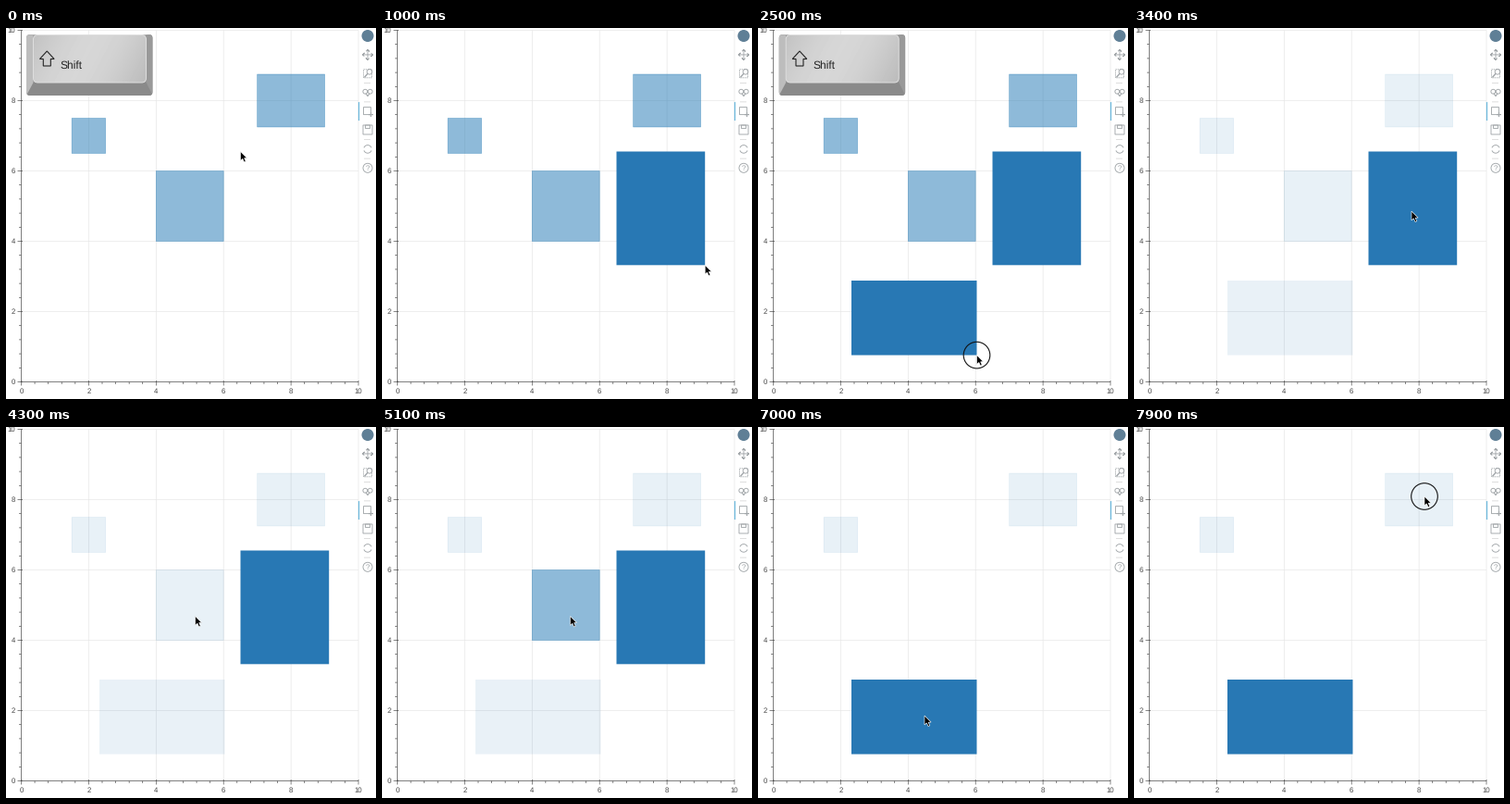
These frames come from a looping animation (400 px wide and 401 px high, 8000 ms). A matplotlib script:

```python
import matplotlib.pyplot as plt
import numpy as np
from matplotlib.animation import FuncAnimation
from matplotlib.patches import Arc, Circle, FancyBboxPatch, Polygon, Rectangle

W, H, DPI = 400, 401, 100
FRAMES, STEP = 80, 100
PT = 72 / DPI
THIN = 0.65
INK, GRID, ICON = "#444444", "#e5e5e5", "#a1a6a9"
BLUE, DEEP = "#1f77b4", "#2878b4"
NORMAL, MUTED = 0.5, 0.1

plt.rcParams.update({"path.snap": False, "text.hinting": "none",
                     "font.family": "Liberation Sans"})
fig = plt.figure(figsize=(W / DPI, H / DPI), dpi=DPI, facecolor="white")
ax = fig.add_axes([0, 0, 1, 1])
ax.axis("off")


def px(x):
    return 16.5 + 36.45 * x


def py(y):
    return 382.5 - 38 * y


def line(xs, ys, color=INK, width=THIN, z=1.0):
    return ax.plot(xs, ys, color=color, lw=width * PT, zorder=z,
                   solid_capstyle="butt")[0]


def label(x, y, s, size, color=INK, z=3.0, **kw):
    return ax.text(x, y, s, fontsize=size * PT, color=color, zorder=z, **kw)


def outline(patch, color=ICON, width=0.9, z=3.0):
    patch.set(fill=False, edgecolor=color, linewidth=width * PT, zorder=z)
    return ax.add_patch(patch)


def fill(patch, color, z):
    patch.set(facecolor=color, edgecolor="none", zorder=z)
    return ax.add_patch(patch)


def draw_axes():
    xs, ys = [px(0), px(10)], [py(0), py(10)]
    for v in range(0, 11, 2):
        line([px(v)] * 2, ys, GRID)
        line(xs, [py(v)] * 2, GRID)
    line(xs, [ys[0]] * 2, z=4)
    line([xs[0]] * 2, ys, z=4)
    for i in range(26):
        v, major = i / 2.5, i % 5 == 0
        out, inside = (4, 1.5) if major else (2.5, 0)
        line([px(v)] * 2, [ys[0] - inside, ys[0] + out], z=4)
        line([xs[0] - out, xs[0] + inside], [py(v)] * 2, z=4)
        if major:
            label(px(v), 393, f"{v:.0f}", 7.8, ha="center", va="center")
            label(10.3, py(v) + 0.3, f"{v:.0f}", 7.8, ha="right",
                  va="center")


def draw_toolbar():
    cx, gap = 391, 20.4
    _, pan, zoom, wheel, edit, save, reset, info = 8.5 + gap * np.arange(8)
    fill(Circle((cx, 8.5), 6.5), "#5f7f96", 3)
    for y in (zoom, wheel, save, reset):
        line([cx - 4, cx + 3], [y + gap / 2] * 2, "#cccccc")
    line([381.5] * 2, [edit - 10, edit + 10], "#6db9dc", 1.3, z=5)

    for turn in range(4):
        c, s = np.cos(turn * np.pi / 2), np.sin(turn * np.pi / 2)
        u, v = np.array([0, 5.5, 3.7, 5.5, 3.7]), np.array([0, 0, 1.8, 0, -1.8])
        line(cx + c * u - s * v, pan + s * u + c * v, ICON, 0.9)

    frame = outline(Rectangle((cx - 4.5, zoom - 4.5), 9, 9))
    frame.set_linestyle((0, (1.5, 1)))
    outline(Circle((cx + 2, zoom - 2), 2.8))
    line([cx, cx - 3.5], [zoom, zoom + 4], ICON, 1.4)

    for side in (-1, 1):
        outline(Circle((cx + 2.7 * side, wheel - 1), 2.4))
        line([cx, cx + 2 * side], [wheel + 4, wheel + 1], ICON, 1.1)

    outline(Rectangle((cx - 4.5, edit - 4.5), 8, 8))
    line([cx + 1, cx + 6], [edit + 3.5] * 2, ICON, 1.2)
    line([cx + 3.5] * 2, [edit + 1, edit + 6], ICON, 1.2)

    outline(Rectangle((cx - 5, save - 5.5), 10, 10))
    outline(Rectangle((cx - 2.5, save - 5.5), 5, 3.5))

    for start in (20, 200):
        outline(Arc((cx, reset), 8.6, 8.6, theta1=start, theta2=start + 140))

    outline(Circle((cx, info), 5))
    label(cx, info + 0.3, "?", 8, ICON, ha="center", va="center")


def rounded(x, y, w, h, r):
    return FancyBboxPatch((x, y), w, h,
                          boxstyle=f"round,pad=0,rounding_size={r}")


def corners(x, y, w, h):
    return [(x, y), (x + w, y), (x + w, y + h), (x, y + h)]


def make_key(x, y, name):
    """A bevelled key cap; returns its artists."""
    w, h = 136.5, 66
    inner = (x + 7.5, y + 0.5, w - 14.5, 51.5)
    body = fill(rounded(x, y, w, h, 4), "#8c8c8c", 10)
    parts = [body]
    rim, top = corners(x, y, w, h), corners(*inner)
    for i, grey in enumerate((0.85, 0.6, 0.54, 0.74)):
        j = (i + 1) % 4
        bevel = fill(Polygon([rim[i], rim[j], top[j], top[i]]), str(grey), 10.5)
        bevel.set_clip_path(body)
        parts.append(bevel)

    face = fill(rounded(*inner, 5), "#cccccc", 11)
    u, v = np.meshgrid(np.linspace(0, 1, 64), np.linspace(0, 1, 64))
    tone = 0.76 + 0.08 * np.sin(np.pi * (0.9 * u + 0.2 * v))
    x0, y0, fw, fh = inner
    shine = ax.imshow(tone, cmap="gray", vmin=0, vmax=1, aspect="auto",
                      extent=(x0, x0 + fw, y0 + fh, y0), zorder=11.2)
    shine.set_clip_path(face)
    edge = outline(rounded(*inner, 5), "#dedede", 1, 11.5)
    parts += [face, shine, edge]

    if name == "Shift":
        half = np.array([(0, 0), (7.8, 8.5), (4, 8.5), (4, 16)])
        shape = np.vstack([half, half[::-1] * (-1, 1)]) + (x + 22.3, y + 18)
        parts.append(outline(Polygon(shape), "#222222", 1.1, 12))
        size, tx = 12, x + 36.5
    else:
        ty = y + 15.5
        head = np.array([(0, 0), (7, -3.5), (7, 3.5)]) + (x + 20.5, ty)
        parts.append(line([x + 26, x + 58.5], [ty] * 2, "#111111", 1.2, 12))
        parts.append(fill(Polygon(head), "#111111", 12))
        size, tx = 12.8, x + 39
    parts.append(label(tx, y + 37, name, size, "#222222", 12))
    return parts


def block(x0, y0, x1, y1, color=BLUE, edge=THIN):
    return ax.add_patch(Rectangle((x0, y0), x1 - x0, y1 - y0, fc=color,
                                  ec=color, lw=edge * PT, alpha=NORMAL,
                                  zorder=2))


def data_block(cx, cy, w, h):
    return block(px(cx - w / 2), py(cy + h / 2),
                 px(cx + w / 2), py(cy - h / 2))


def grow(rect, end):
    x, y = rect.get_xy()
    rect.set(width=end[0] - x, height=end[1] - y)


draw_axes()
draw_toolbar()

small = data_block(2, 7, 1, 1)
middle = data_block(5, 5, 2, 2)
corner = data_block(8, 8, 2, 1.5)

TALL, WIDE = (253.5, 133.5), (101, 273)
tall = block(*TALL, *TALL, DEEP, 0)
wide = block(*WIDE, *WIDE, DEEP, 0)

keys = [
    (make_key(22, 7, "Shift"), 0, 900),
    (make_key(22.7, 7, "Shift"), 1600, 2800),
    (make_key(22, 7, "Shift"), 4400, 5000),
    (make_key(21.7, 7.5, "Backspace"), 5400, 6300),
]

# pointer moves: start, arrival, place; each arrival is a click
MOVES = [
    (0, 100, TALL),
    (300, 800, (349.2, 256.3)),
    (1000, 1600, WIDE),
    (1800, 2400, (236.5, 353.6)),
    (2700, 3200, (300, 198)),
    (3600, 4500, (203.5, 204.5)),
    (6300, 6800, (180, 312)),
    (7200, 7800, (314, 75)),
]
CLICK_TIME = 200

ARROW = 0.96 * np.array([(0, 0), (0, 10.3), (2.4, 8.2), (4.2, 12),
                         (6, 11.2), (4.3, 7.5), (7.4, 7.4)])
cursor = ax.add_patch(Polygon(ARROW, fc="black", ec="white", lw=0.6 * PT,
                              zorder=21))
click = outline(Circle((0, 0), 14.3), "#111111", 1.1, 20)

ax.set_xlim(0, W)
ax.set_ylim(H, 0)


def pointer(t):
    pos = np.array(TALL)
    for start, end, place in MOVES:
        s = np.clip((t - start) / (end - start), 0, 1)
        pos = pos + (1 - (1 - s) ** 3) * (np.array(place) - pos)
    return pos


def update(n):
    t = n * STEP
    pos = pointer(t)
    cursor.set_xy(ARROW + pos)
    click.center = pos
    click.set_visible(any(0 <= t - end < CLICK_TIME for _, end, _ in MOVES))
    for parts, show, hide in keys:
        for p in parts:
            p.set_visible(show <= t < hide)

    grow(tall, pointer(np.clip(t, 300, 800)))
    grow(wide, pointer(np.clip(t, 1800, 2600)))
    deleted = t >= 5600
    tall.set_visible(t > 300 and not deleted)
    middle.set_visible(not deleted)
    wide.set_visible(t > 1800)

    tall_picked = 3300 <= t < 5600
    dim = MUTED if tall_picked or t >= 6900 else NORMAL
    small.set_alpha(dim)
    corner.set_alpha(dim)
    middle.set_alpha(dim if t < 4600 else NORMAL)
    tall.set_alpha(1)
    wide.set_alpha(MUTED if tall_picked else 1)
    return []


anim = FuncAnimation(fig, update, frames=FRAMES, interval=STEP, repeat=True,
                     repeat_delay=0, blit=False)
plt.show()
```
